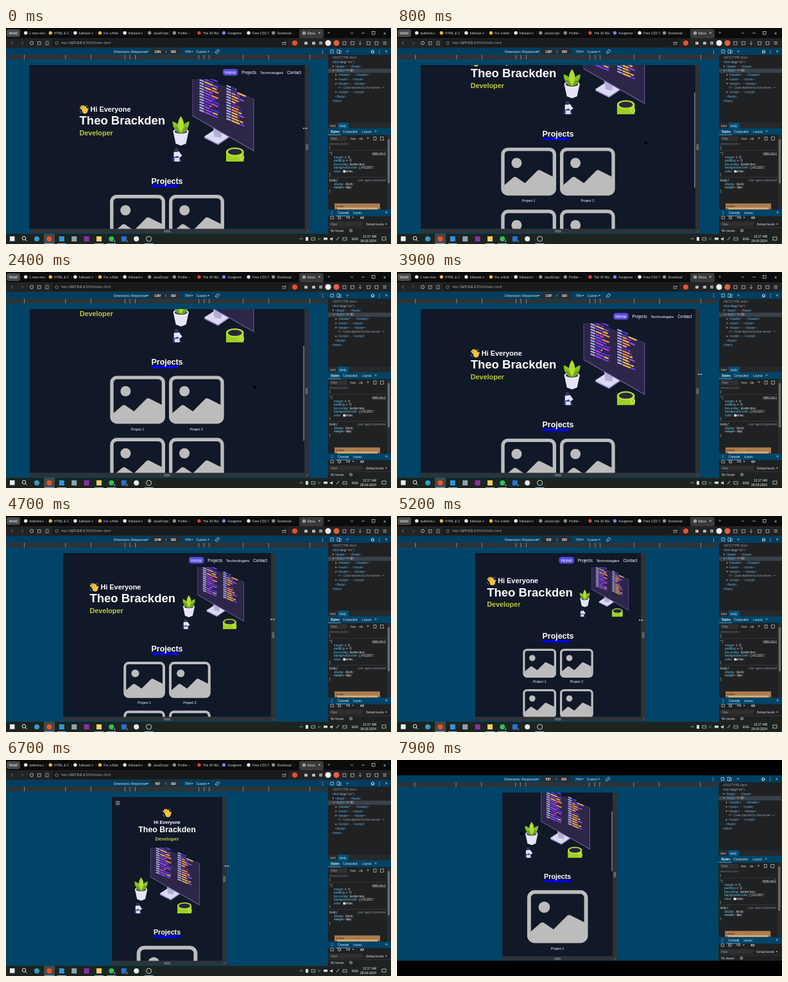
An HTML page with a canvas that plays this animation: 600 by 338 pixels, repeating every 8000 ms.

```html
<!DOCTYPE html>
<html lang="en">
<head>
<meta charset="utf-8">
<title>Responsive portfolio</title>
<style>
html, body { margin: 0; width: 100%; height: 100%; overflow: hidden; background: #000; }
canvas { display: block; }
</style>
</head>
<body>
<canvas id="stage" width="600" height="338"></canvas>
<script>
const c = document.getElementById('stage').getContext('2d');
const LOOP = 8000, MID = 251, TOP = 58, VIEW = 256.5, SCALE = 0.309;
const BLUE = '#004467', DARK = '#202123', PAGE = '#111827', TAG = '#66b4e6', GREY = '#9a9da0';

// Drawing helpers
function rect(x, y, w, h, fill, r = 0) {
  c.fillStyle = fill;
  c.beginPath();
  c.roundRect(x, y, w, h, r);
  c.fill();
}
function box(x, y, w, h, color = '#ccc', width = 0.7) {
  c.strokeStyle = color;
  c.lineWidth = width;
  c.strokeRect(x, y, w, h);
}
function oval(x, y, rx, ry, fill) {
  c.fillStyle = fill;
  c.beginPath();
  c.ellipse(x, y, rx, ry, 0, 0, 7);
  c.fill();
}
const dot = (x, y, r, fill) => oval(x, y, r, r, fill);
function poly(points, fill) {
  c.fillStyle = fill;
  c.beginPath();
  points.forEach(p => c.lineTo(...p));
  c.fill();
}
function line(points, color, width = 0.7) {
  c.strokeStyle = color;
  c.lineWidth = width;
  c.beginPath();
  points.forEach(p => c.lineTo(...p));
  c.stroke();
}
function ring(x, y, r, color, width = 0.8) {
  c.strokeStyle = color;
  c.lineWidth = width;
  c.beginPath();
  c.arc(x, y, r, 0, 7);
  c.stroke();
}
function text(s, x, y, size, color = '#fff', style = '', align = 'left') {
  c.font = `${style} ${size}px "Liberation Sans", Arial, sans-serif`;
  c.fillStyle = color;
  c.textAlign = align;
  c.fillText(s, x, y);
  return c.measureText(s).width;
}
// Draws [string, colour] runs one after another
function runs(x, y, parts, style) {
  for (const [s, color] of parts) x += text(s, x, y, 4.65, color, style);
}
function arrow(x, y, color = '#aaa', down = false) {
  poly(down ? [[x, y - 1], [x + 3, y - 1], [x + 1.5, y + 1]] : [[x, y - 1.5], [x + 2.2, y], [x, y + 1.5]], color);
}
function clipTo(x, y, w, h) {
  c.beginPath();
  c.rect(x, y, w, h);
  c.clip();
}

// Values at time t along [time, ...values] keys
function track(t, keys, ease = u => u) {
  const i = keys.findIndex(k => k[0] > t);
  if (i === 0) return keys[0].slice(1);
  if (i < 0) return keys[keys.length - 1].slice(1);
  const a = keys[i - 1], b = keys[i], u = ease((t - a[0]) / (b[0] - a[0]));
  return a.slice(1).map((v, j) => v + (b[j + 1] - v) * u);
}
const smooth = u => u * u * (3 - 2 * u);

const WIDTHS = [[0, 1391], [300, 1387], [3900, 1387], [5200, 838], [6500, 557]];
const SCROLLS = [[500, 0], [1200, 186], [1800, 186], [3050, 0], [7000, 0], [7700, 80]];
const POINTER = [[0, 466, 157], [300, 466, 157], [800, 388, 180], [2950, 388, 180], [3700, 472, 160],
  [3900, 472, 160], [5200, 380, 163], [6500, 344, 166], [6750, 344, 166], [7400, 194, 115]];

// Page parts
function wave(x, y) {
  c.save();
  c.translate(x, y);
  c.lineCap = 'round';
  const skin = '#f5c342';
  [[1.5, 4, 6, 9], [3.2, 1.8, 8, 8], [6, 1.5, 9.5, 7], [9, 2.8, 11, 8], [12.8, 6, 11, 10]]
    .forEach(([a, b, d, e]) => line([[a, b], [d, e]], skin, 2.3));
  oval(8.5, 9.5, 4.3, 4, skin);
  line([[10.5, 0.5], [13, 2.5]], '#6fa6d6', 0.8);
  line([[0.5, 9], [2.5, 12.5]], '#6fa6d6', 0.8);
  c.restore();
}

// Flush-left code: a short pale token, then one or two coloured ones
function codeColumn(x, y, rows, seed) {
  const colors = ['#f58a55', '#6b3df5', '#c33df0', '#8f4af2', '#f2b45a', '#4a35e0'];
  const rand = () => (seed = (seed * 16807) % 2147483647) / 2147483647;
  for (let i = 0; i < rows; i++) {
    const top = y + i * 4.3, split = 13 + rand() * 8, end = split + rand() * 14;
    const token = (from, to, color) =>
      line([[x + from, top + from * 0.42], [x + to, top + to * 0.42]], color, 2.3);
    token(0, 7, '#b3abe6');
    token(8, split, colors[Math.floor(rand() * 6)]);
    token(split + 1, end + 1, colors[Math.floor(rand() * 6)]);
  }
}

function leaf(x, y, tx, ty, fat, color) {
  const mx = (x + tx) / 2, my = (y + ty) / 2, dx = (y - ty) * fat, dy = (tx - x) * fat;
  c.fillStyle = color;
  c.beginPath();
  c.moveTo(x, y);
  c.quadraticCurveTo(mx - dx, my - dy, tx, ty);
  c.quadraticCurveTo(mx + dx, my + dy, x, y);
  c.fill();
}

function illustration(x, y, size) {
  c.save();
  c.translate(x, y);
  c.scale(size / 129, size / 129);
  clipTo(0, 0, 129, 129);
  c.lineCap = 'butt';
  // Monitor
  poly([[50, 92], [70, 79], [91, 90], [72, 103]], '#9993c8');
  poly([[50, 90], [70, 77], [91, 88], [72, 101]], '#dcd9f3');
  poly([[64, 74], [78, 82], [77, 92], [66, 90]], '#b4afd9');
  poly([[32, -9], [128, 31], [128, 113], [32, 58]], '#6a629e');
  poly([[32.7, -9], [127, 31], [127, 111], [32.7, 57]], '#2d2648');
  codeColumn(43, -12, 15, 71);
  codeColumn(85, 10, 13, 913);
  // Plant
  poly([[2, 82], [26, 82], [22, 101], [14, 104], [6, 101]], '#e6e5f3');
  oval(14, 82, 12, 5, '#f7f6fd');
  oval(14, 82, 10, 3.6, '#4a3d5c');
  leaf(14, 84, 1, 66, 0.38, '#86c021');
  leaf(14, 84, 27, 66, 0.38, '#86c021');
  leaf(14, 85, 4, 74, 0.4, '#6da51c');
  leaf(14, 85, 25, 74, 0.4, '#6da51c');
  leaf(14, 84, 14, 58, 0.36, '#b0dc35');
  // Mug
  rect(84.5, 114, 27.5, 15, '#9fd021');
  oval(98.3, 114, 13.8, 7, '#b8e23a');
  oval(98.3, 114, 11, 4.8, '#29263a');
  ring(109, 123, 3, '#c4ea50', 1.6);
  // Seated figure
  poly([[3, 114], [11, 113], [16, 120], [10, 124], [3, 124]], '#dfe6f7');
  poly([[1, 123], [9, 120], [16, 129], [1, 129]], '#2c3b78');
  dot(7, 111, 3, '#3a3560');
  rect(4, 123, 8, 6, '#d5daee');
  c.restore();
}

// Outlined image placeholder on a 16-unit grid
function picture(x, y, w) {
  const grey = '#bcbcbc';
  c.save();
  c.translate(x, y);
  c.scale(w / 16, w / 16);
  c.strokeStyle = grey;
  c.lineWidth = 1;
  c.beginPath();
  c.roundRect(0.5, 0.5, 15, 13, 1.5);
  c.stroke();
  dot(4.5, 4.5, 1.5, grey);
  poly([[0.9, 11], [3.65, 8.6], [4.28, 8.55], [6.94, 10.36], [10.65, 6.65], [11.22, 6.55], [15.1, 8.5], [15.1, 13.1], [0.9, 13.1]], grey);
  c.restore();
}

function heading(s, base, size, part) {
  c.font = `bold ${size}px "Liberation Sans", Arial, sans-serif`;
  const w = c.measureText(s).width;
  rect(MID - w / 2 + 0.4, base + 1.6, w * part, 4, '#0000f5', 1.5);
  text(s, MID, base, size, '#fff', 'bold', 'center');
}

function page(width, scroll, barShown) {
  const w = width * SCALE, left = MID - w / 2, right = left + w, narrow = width < 700;
  c.save();
  clipTo(left, TOP, w, VIEW);
  rect(left, TOP, w, VIEW, PAGE);
  c.translate(0, -scroll);
  let base;
  if (narrow) {
    for (let i = 0; i < 3; i++) line([[left + 6, 65 + i * 2.3], [left + 12.5, 65 + i * 2.3]], '#ddd', 0.8);
    wave(244, 76);
    text('Hi Everyone', MID, 100, 7.2, '#fff', 'bold', 'center');
    text('Theo Brackden', MID, 113, 12.4, '#fff', 'bold', 'center');
    text('Developer', MID, 126, 7.7, '#bdc840', 'bold', 'center');
    const size = w * 0.6;
    illustration(MID - size / 2, 137, size);
    base = 137 + size + 32.5;
  } else {
    rect(right - 128, 64, 23.5, 10.5, '#554bd8', 4);
    text('Home', right - 125, 71.5, 6.4);
    text('Projects', right - 98.7, 71.5, 6.4);
    text('Technologies', right - 70, 71.5, 6.2);
    text('Contact', right - 28, 71.5, 6.4);
    const size = w * 0.3, x = MID - (144 + size) / 2, mid = 80 + size / 2;
    wave(x, mid - 24);
    text('Hi Everyone', x + 17, mid - 13.5, 10.9, '#fff', 'bold');
    text('Theo Brackden', x, mid + 6.7, 18.5, '#fff', 'bold');
    text('Developer', x, mid + 23.5, 10.8, '#bdc840', 'bold');
    illustration(x + 144, 80, size);
    base = 80 + size + 34.8;
  }
  const part = narrow ? 1 : 0.86, titleSize = narrow ? 10.7 : 12.4;
  heading('Projects', base, titleSize, part);
  const cw = w * (narrow ? 0.55 : 0.2), y0 = base + 12 + cw / 16;
  let bottom;
  for (let i = 0; i < 4; i++) {
    const x = narrow ? MID - cw / 2 : MID + (i % 2 ? 3 : -3 - cw);
    const y = y0 + (narrow ? i : i >> 1) * (cw + 11.5);
    picture(x, y, cw);
    bottom = y + cw * 0.875;
    text('Project ' + (i + 1), x + cw / 2, bottom + 4.8 + cw / 16, 5.2, '#fff', '', 'center');
  }
  heading('Contact Me', bottom + 38, titleSize, 0.91);
  const iconY = bottom + 59;
  dot(237, iconY, 4.5, '#fff');
  rect(246.5, iconY - 4.5, 9, 9, '#1f6fc0');
  dot(265, iconY, 3.8, '#3a7fd0');
  c.restore();

  if (barShown) {
    const doc = bottom + 66 - TOP;
    rect(right - 2, TOP + scroll / doc * VIEW, 1.5, VIEW * VIEW / doc, '#7d828b', 0.7);
  }
  // Resize gutters
  rect(right, TOP, 6.5, VIEW + 6, '#303235');
  rect(left, TOP + VIEW, w, 6, '#303235');
  for (const d of [-1, 1]) {
    line([[right + 3.2 + d, 182], [right + 3.2 + d, 191]], '#a5a7aa', 0.8);
    line([[246, 318 + d], [256, 318 + d]], '#a5a7aa', 0.8);
  }
  line([[right + 2, 320], [right + 6, 316]], '#a5a7aa', 0.6);
}

function tabs(t) {
  rect(0, 0, 600, 16, '#0b0c0d');
  rect(1, 2, 21, 12, '#4a4b4d', 3);
  text('WebD', 11.5, 9.8, 5, '#fff', '', 'center');
  const phase = t % 2000, alert = phase > 550 && phase < 1550 ? 'dulbrime.c' : '1 new mes';
  const names = [alert, 'HTML & C', 'fullstack n', 'For a Mob', 'fullstack n', 'JavaScript', 'Profile – ', 'The 30 Wa', 'Assignme', 'Free CSS T', 'Download'];
  const marks = ['#eee', '#e5b93a', '#eee', '#e5b93a', '#eee', '#8b8d90', '#8b8d90', '#d5452f', '#7b83eb', '#eee', '#8b8d90'];
  names.forEach((s, i) => {
    const x = 28 + i * 38.6;
    dot(x + 2.7, 7.7, 2.7, marks[i]);
    c.save();
    clipTo(x + 8, 0, 26, 16);
    text(s, x + 8.5, 9.8, 5, '#d2d3d5');
    c.restore();
    line([[x + 35, 5], [x + 35, 11]], '#3d3e40', 0.5);
  });
  rect(457, 1.5, 38, 14.5, '#393a3c', 3);
  dot(464.5, 8, 2.8, '#9a9c9f');
  text('Docu', 470, 9.8, 5);
  text('×', 486.5, 10.2, 6.5);
  text('+', 501, 10.4, 7, '#ccc');
  line([[537, 7], [539, 9], [541, 7]], '#ddd');
  line([[554, 8], [559, 8]], '#ddd');
  box(570.5, 5.5, 4.5, 4.5, '#ddd');
  text('×', 588, 10.5, 7);

  rect(0, 16, 600, 15, '#222325');
  rect(72, 17.5, 368, 12, '#191a1b', 3);
  line([[11, 21], [8, 23.5], [11, 26]], '#999');
  line([[24, 21], [27, 23.5], [24, 26]], '#777');
  ring(40, 23.5, 2.5, '#ddd');
  box(49.5, 21.5, 4.5, 4.5, '#ccc');
  line([[62, 21], [66, 21], [66, 27], [64, 25.5], [62, 27], [62, 21]], '#bbb');
  ring(79, 23.5, 2.3, '#bbb', 0.6);
  let x = 86;
  for (const [s, color] of [['http://', GREY], ['127.0.0.1', '#eee'], [':5500/index.html', GREY]])
    x += text(s, x, 25.4, 5.5, color);
  box(431, 22.5, 5, 3.5, '#bbb');
  line([[433, 24], [436, 21]], '#bbb');
  dot(450, 23.5, 4, '#e8502d');
  rect(465, 21.5, 5, 4.5, '#bbb', 1);
  rect(477, 21.5, 5, 4.5, '#bbb', 1);
  rect(488, 21, 5, 5, '#8f9499', 1);
  dot(502, 23.5, 4.5, '#f2f2f2');
  dot(515, 23.5, 4.5, '#e5603c');
  for (const bx of [525, 537.5, 562.5, 575]) box(bx, 21.3, 4.8, 4.8, '#ccc');
  line([[552, 20], [552, 26], [550, 24], [552, 26], [554, 24]], '#ccc');
  for (let i = 0; i < 3; i++) line([[587.5, 21.5 + i * 2], [593, 21.5 + i * 2]], '#ccc', 0.7);
}

function deviceBar(width) {
  rect(0, 31, 502, 11, '#003e60');
  text('Dimensions: Responsive', 168, 38.8, 4.7, '#e2e9ee');
  arrow(219, 37, '#ccc', true);
  rect(225, 32.5, 23, 8.5, '#2a2b2d', 1);
  text(Math.round(width), 236.5, 38.8, 4.65, '#fff', 'bold', 'center');
  rect(250.5, 32.5, 21.5, 8.5, '#2a2b2d', 1);
  text('830', 261, 38.8, 4.65, '#fff', 'bold', 'center');
  text('×', 249.3, 38.8, 4.5, '#ccc', '', 'center');
  text('79%', 278.5, 38.8, 4.7, '#e2e9ee');
  arrow(288.5, 37, '#ccc', true);
  text('Custom', 296.5, 38.8, 4.7, '#e2e9ee');
  arrow(314, 37, '#ccc', true);
  line([[326, 38], [330.5, 33.8], [332.5, 36], [328.5, 40], [326, 38]], '#ddd', 0.9);
  for (const y of [34.8, 37, 39.2]) dot(493.5, y, 0.6, '#ddd');
  // Preset widths shown as nested bars
  rect(0, 42, 500, 7, '#2f3336');
  for (const preset of [320, 375, 425, 768, 1024, 1440])
    for (const side of [-1, 1]) rect(MID + side * preset * SCALE / 2 - 0.5, 42, 1, 7, '#868f95');
}

function devtools() {
  const tree = [
    [508, [['<!DOCTYPE html>', GREY]]],
    [508, [['<html ', TAG], ['lang', '#9bd0f5'], ['="', TAG], ['en', '#f29766'], ['">', TAG]]],
    [513, [['<head>', TAG], [' ⋯ ', GREY], ['</head>', TAG]], 1],
    [513, [['<body>', TAG], [' == $0', '#cfd2d4']], 2],
    [517.5, [['<header>', TAG], [' ⋯ ', GREY], ['</header>', TAG]], 1],
    [517.5, [['<main>', TAG], [' ⋯ ', GREY], ['</main>', TAG]], 1],
    [517.5, [['<footer>', TAG], [' ⋯ ', GREY], ['</footer>', TAG]], 1],
    [517, [['<!-- Code injected by live-server -->', GREY]]],
    [517.5, [['<script>', TAG], [' ⋯ ', GREY], ['<\/script>', TAG]], 1],
    [513, [['</body>', TAG]]],
    [508, [['</html>', TAG]]]];
  rect(502, 31, 98, 291, DARK);
  rect(502, 31, 98, 11, '#003e60');
  box(506, 34.5, 4.5, 4.5, '#cfe0ea');
  box(516, 34, 3.5, 5.5, '#cfe0ea');
  box(519.5, 35.5, 2.5, 4, '#cfe0ea');
  text('»', 530, 39.3, 7.5, '#8fcbf3');
  ring(571.5, 37, 2, '#d5e2ea', 1.1);
  for (const y of [34.8, 37, 39.2]) dot(582, y, 0.6, '#ddd');
  text('×', 590.5, 39.3, 7, '#ddd');
  rect(502, 63.5, 98, 6.8, '#3a4148');
  text('⋯', 503, 68.4, 4.5, GREY);
  tree.forEach(([x, parts, fold], i) => {
    const y = 46.5 + i * 6.75;
    if (fold) arrow(x - 4, y, '#aaa', fold === 2);
    runs(x, y + 1.7, parts);
  });
  rect(502, 148, 98, 9, '#26292b');
  rect(517, 148, 17, 9, '#00507a');
  text('html', 505, 154.5, 4.65, '#c5c8ca');
  text('body', 520, 154.5, 4.65, '#cfe6f5');
  rect(502, 157, 98, 10.5, BLUE);
  text('Styles', 506, 164, 4.7, '#fff', 'bold');
  text('Computed', 525, 164, 4.9, '#dbe5ec');
  text('Layout', 555, 164, 4.9, '#dbe5ec');
  text('»', 574, 164.3, 7, '#8fcbf3');
  rect(502, 166.7, 20, 0.8, '#6cbdf0');
  rect(504, 169, 28, 8, '#2d2f31', 1);
  text('Filter', 506, 174.8, 4.65, GREY);
  text(':hov   .cls', 536, 174.8, 4.8, '#ddd');
  text('+', 562, 175.3, 7, '#ddd');
  box(573, 170.5, 4, 5);
  box(583.5, 170.5, 5, 5);
  rect(594, 168, 5, 116, '#2c2d2f');
  rect(594.7, 174, 3.6, 69, '#66686a');

  const cyan = '#5cc8e8', ink = '#e3e5e6';
  runs(504, 182.8, [['element.style {', '#6f7376']]);
  runs(504, 189, [['}', ink]]);
  rect(502, 191.5, 92, 0.6, '#45484a');
  runs(504, 197.7, [['* {', ink]]);
  text('style.css:1', 592, 197.7, 4.65, ink, '', 'right');
  line([[571, 198.6], [592, 198.6]], ink, 0.4);
  const props = [['margin', '    0;'], ['padding', '    0;'], ['box-sizing', ' border-box;'],
    ['background-color', '    #111827;'], ['color', '    white;']];
  props.forEach(([name, value], i) => runs(511, 203.8 + i * 5.45, [[name, cyan], [': ', ink], [value, ink]]));
  arrow(528.5, 202.2);
  arrow(530.5, 207.6);
  box(550.5, 217, 3, 3.6, '#aaa', 0.5);
  rect(525.5, 222.6, 3.4, 3.6, '#fff');
  runs(504, 231, [['}', ink]]);
  rect(502, 233.5, 92, 0.6, '#45484a');
  runs(504, 239.8, [['body {', ink]], 'italic');
  text('user agent stylesheet', 592, 239.8, 4.65, '#8a8d90', 'italic', 'right');
  runs(511, 245.6, [['display', cyan], [':  block;', ink]], 'italic');
  runs(511, 251, [['margin', cyan], [':  ', ink], [' 8px;', ink]], 'italic');
  line([[511, 249.4], [537, 249.4]], '#aaa', 0.4);
  runs(504, 256.8, [['}', ink]]);
  rect(512, 274.5, 71, 9, '#ab7d50');
  text('margin', 514, 279.5, 4.2, '#2b2119');
  text('–', 547, 279.5, 4.5, '#2b2119');
  rect(516, 281, 63, 3, '#d0a873');

  rect(502, 284, 98, 10.5, BLUE);
  for (const y of [287, 289, 291]) dot(508, y, 0.6, '#ddd');
  text('Console', 517, 290.9, 4.7, '#fff');
  text('Issues', 541, 290.9, 4.7, '#dbe5ec');
  text('×', 591, 291.3, 7, '#ddd');
  rect(514, 293.6, 22, 0.8, '#6cbdf0');
  box(506, 294.8, 4.5, 4);
  ring(519.5, 296.8, 2.3, '#ccc');
  line([[518, 295.3], [521, 298.3]], '#ccc');
  text('top', 530, 298.4, 4.65, '#ddd');
  arrow(539.5, 296.8, '#bbb', true);
  oval(555, 296.8, 3, 1.8, '#bbb');
  dot(555, 296.8, 1, DARK);
  rect(504, 303, 52, 7.5, '#2d2f31', 1);
  text('Filter', 506, 308.5, 4.65, GREY);
  text('Default levels', 561, 308.5, 4.65, '#ddd');
  arrow(591, 307, '#bbb', true);
  rect(502, 312, 98, 0.5, '#45484a');
  text('No Issues', 506, 318.8, 4.65, '#ddd');
  ring(537.5, 317, 1.9, '#ccc', 1);
}

function taskbar() {
  rect(0, 322, 600, 16, '#1d2420');
  rect(59, 322, 17, 16, '#444a48');
  rect(6, 326, 7.5, 7.5, '#e6edf2');
  ring(28, 329, 2.8, '#eee', 1);
  line([[30, 331], [32.5, 333.5]], '#eee', 1);
  const icons = ['#2f9fd0', '#ea5428', '#2f95dc', '#8fa3ad', '#8a2fa8', '#f3cf60', '#30c455', '#2675d4', '#e9e9ec', '#d0d3d2'];
  icons.forEach((color, i) => {
    const x = 48 + i * 19.4;
    if (i === 9) ring(x, 330, 4, color, 1);
    else rect(x - 4, 326, 8, 8, color, [0, 1, 6, 8].includes(i) ? 4 : 0);
    if ([1, 2, 5, 6, 9].includes(i)) rect(x - 7, 337, 14, 1, '#7fc0e8');
  });
  for (const x of [169, 188.5]) dot(x, 333, 2.2, '#27343a');
  text('4', 169, 334.6, 3.8, '#fff', '', 'center');
  text('5', 188.5, 334.6, 3.8, '#fff', '', 'center');
  line([[457.5, 331], [460, 328.5], [462.5, 331]], '#eee');
  rect(467, 327, 4, 6, '#ddd', 1);
  box(476, 328, 5.5, 4, '#ddd');
  text('M', 486, 331.7, 4.6, '#43b66a');
  rect(495, 328, 6, 3.5, '#ddd');
  poly([[505, 329], [507, 329], [509, 327], [509, 333], [507, 331], [505, 331]], '#ddd');
  line([[515, 332], [519, 327]], '#ddd', 0.9);
  box(525, 328, 6, 4, '#ddd');
  text('ENG', 539, 331.8, 4.7);
  text('12:17 AM', 577, 328.2, 4.9, '#fff', '', 'right');
  text('28-03-2024', 577, 335.4, 4.9, '#fff', '', 'right');
  box(586, 327, 6, 5, '#eee');
}

function pointer(t) {
  const [x, y] = track(t, POINTER);
  if ((t > 400 && t < 3600) || t > 6900) {
    dot(x, y, 4, '#05070b');
    ring(x, y, 4, '#2a3242', 0.7);
  } else {
    line([[x - 2.5, y], [x + 2.5, y]], '#e8e8e8', 0.6);
    for (const d of [-1, 1]) poly([[x + d * 3.5, y], [x + d * 1.8, y - 1.3], [x + d * 1.8, y + 1.3]], '#e8e8e8');
  }
}

function draw(t) {
  const [width] = track(t, WIDTHS), [scroll] = track(t, SCROLLS, smooth);
  const cropped = t >= 7700;
  rect(0, 0, 600, 338, '#000');
  c.save();
  if (cropped) {
    clipTo(0, 24, 600, 290);
    c.translate(-0.8, -7);
  }
  rect(0, 31, 602, 291, BLUE);
  page(width, scroll, (t > 450 && t < 3300) || t > 6950);
  deviceBar(width);
  devtools();
  if (!cropped) {
    tabs(t);
    taskbar();
  }
  c.restore();
  pointer(t);
}

function tick(now) {
  draw(now % LOOP);
  requestAnimationFrame(tick);
}
requestAnimationFrame(tick);
</script>
</body>
</html>
```
